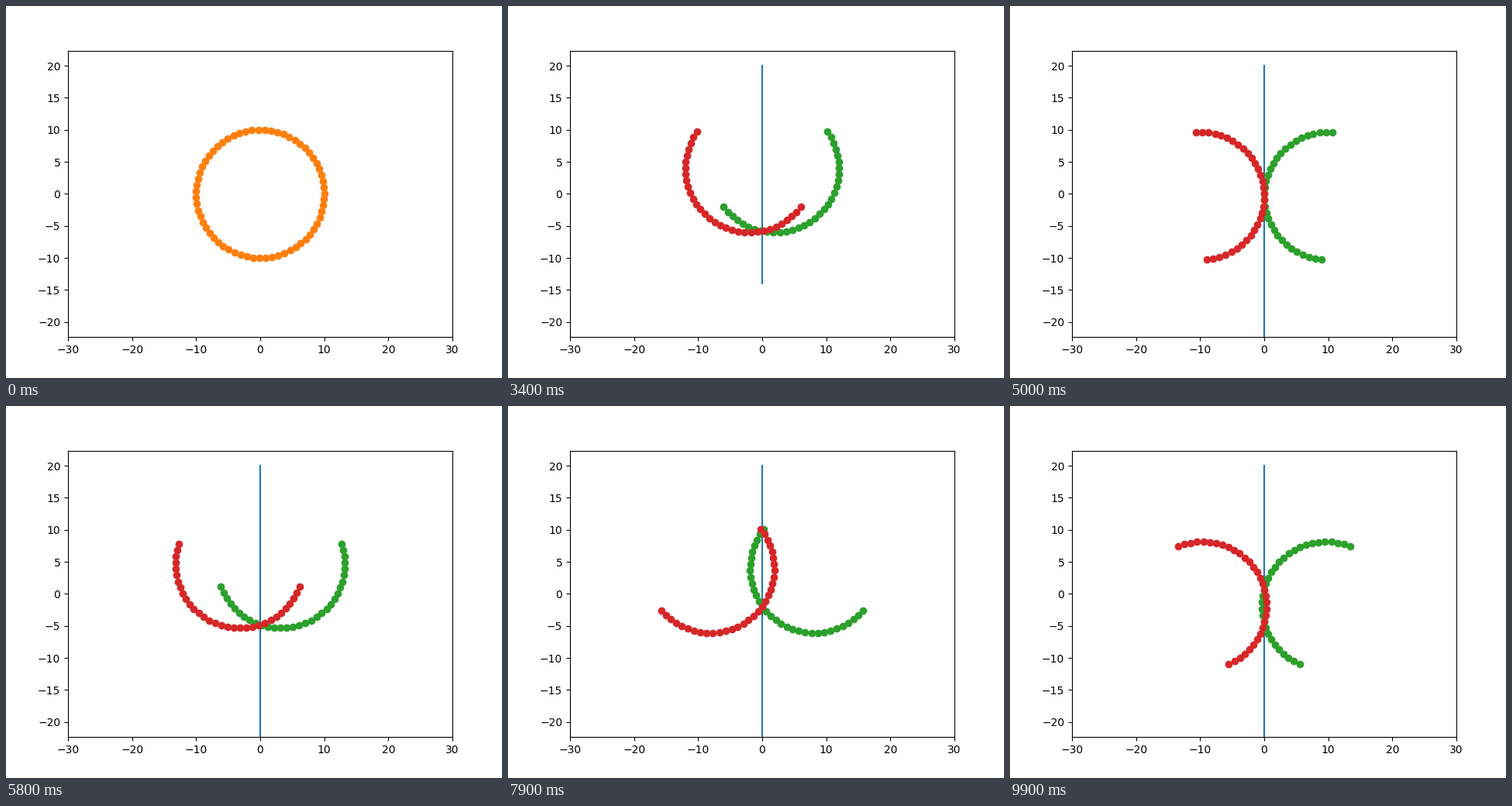
These frames come from a looping animation (640x480 px, 10000 ms). A matplotlib script:

```python
import numpy as np
import matplotlib.pyplot as plt
from matplotlib.animation import FuncAnimation

FRAMES, INTERVAL = 100, 100
RADIUS = 10
SPLIT = 30      # last frame with the whole circle
SPIN = 0.25     # radians per frame

circle = np.arange(0, 2 * np.pi, 0.1)
half = np.arange(np.pi / 2, 3 * np.pi / 2, 0.1)

fig, ax = plt.subplots(figsize=(6.4, 4.8), dpi=100)
ax.set_xlim(-30, 30)
y_max = 30 * 369.6 / 496  # equal scale on both axes
ax.set_ylim(-y_max, y_max)

cut, = ax.plot([], [], color="C0")
ring, = ax.plot([], [], "o", color="C1")
right, = ax.plot([], [], "o", color="C2")
left, = ax.plot([], [], "o", color="C3")


def half_ring(angle):
    """Half circle turning while its centre orbits (5, 0)."""
    x = 5 + 5 * np.cos(angle) + RADIUS * np.cos(half + angle)
    y = 5 * np.sin(angle) + RADIUS * np.sin(half + angle)
    return x, y


def update(i):
    if i:
        cut.set_data([0, 0], [20, 20 - i])
    else:
        cut.set_data([], [])

    if i <= SPLIT:
        ring.set_data(RADIUS * np.cos(circle), RADIUS * np.sin(circle))
        right.set_data([], [])
        left.set_data([], [])
    else:
        x, y = half_ring(SPIN * i)
        ring.set_data([], [])
        right.set_data(x, y)
        left.set_data(-x, y)
    return cut, ring, right, left


anim = FuncAnimation(fig, update, frames=FRAMES, interval=INTERVAL,
                     repeat=True, repeat_delay=0)
plt.show()
```
